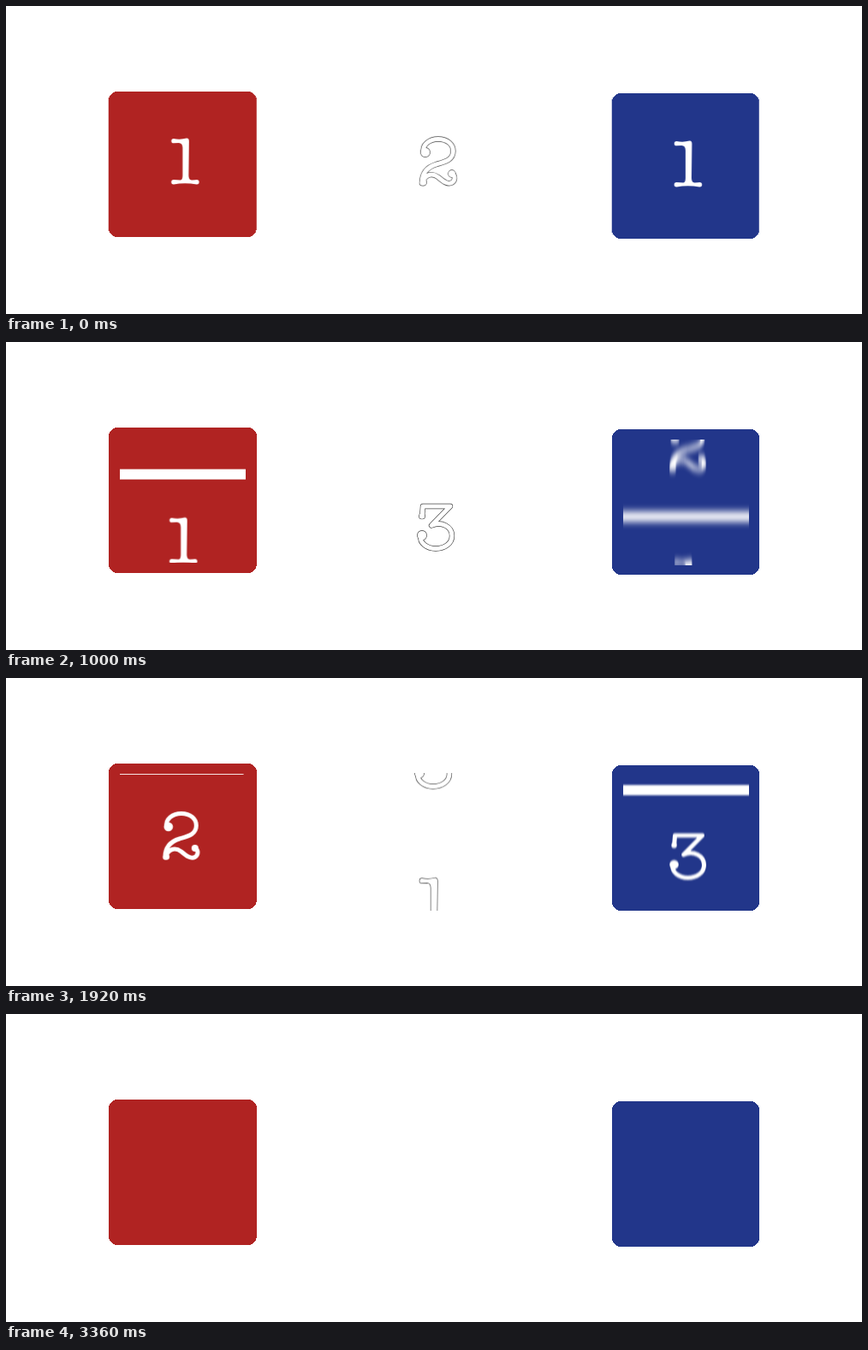
An HTML page without scripts for the animation above (3.84 s loop, 1000x360 px).

```html
<!DOCTYPE html>
<html lang="en">
<head>
<meta charset="utf-8">
<title>Three spinning reels</title>
<style>
  html, body { margin: 0; width: 100%; height: 100%; overflow: hidden; background: #fff; }
  svg { display: block; width: 100%; height: 100%; }

  /* --o widens a glyph, used for the hairline outline */
  .reel { color: #fff; --o: 0px; }
  .edge { color: #444; --o: 1.3px; }
  .pen { fill: none; stroke: currentColor; stroke-width: calc(5px + var(--o)); stroke-linejoin: round; }
  .solid { fill: currentColor; stroke: currentColor; stroke-width: var(--o); }
  .bars { fill: none; stroke: #fff; stroke-width: 180; stroke-dasharray: 12 147; }
  .box { shape-rendering: crispEdges; }

  .shake { animation: shake 3.84s infinite; }
  .strip { animation: spin 3.84s infinite; }
  .red  { --a: 304px; --b: 527px; --c: 852px; --end: 1115px; --lean: -.0045; }
  .mid  { --a: 304px; --b: 670px; --c: 1202px; --end: 1579px; --lean: -.0045; }
  .blue { --a: 161px; --b: 414.5px; --c: 728.5px; --end: 955.5px; --lean: 0; }

  @keyframes spin {
    0% { transform: translate(0, 0); animation-timing-function: cubic-bezier(.333, .03, .667, .45); }
    16.667% { transform: translate(calc(var(--a) * var(--lean)), var(--a)); animation-timing-function: cubic-bezier(.333, .27, .667, .69); }
    26.042% { transform: translate(calc(var(--b) * var(--lean)), var(--b)); animation-timing-function: cubic-bezier(.333, .38, .667, .785); }
    41.667% { transform: translate(calc(var(--c) * var(--lean)), var(--c)); animation-timing-function: cubic-bezier(.333, .85, .667, 1); }
    87.5%, 100% { transform: translate(calc(var(--end) * var(--lean)), var(--end)); }
  }
  /* four sine waves in the first second */
  @keyframes shake {
    0% { transform: translateX(0); animation-timing-function: ease-out; }
    1.628%, 8.138%, 14.648%, 21.159% { transform: translateX(-9px); animation-timing-function: cubic-bezier(.364, 0, .636, 1); }
    4.883%, 11.393%, 17.904% { transform: translateX(9px); animation-timing-function: cubic-bezier(.364, 0, .636, 1); }
    24.414% { transform: translateX(9px); animation-timing-function: ease-in; }
    26.042%, 100% { transform: translateX(0); }
  }
</style>
</head>
<body>
<svg viewBox="0 0 1000 360" role="img" aria-label="Three spinning number reels">
  <defs>
    <!-- digits: centred on x = 0, top at y = 0 -->
    <path id="d1" class="solid" d="M-13 1Q-5 2.5 2 .5Q5 0 5 4L4.5 44Q4.5 49 8 49.5Q13 49 14 49A2.7 2.7 0 0 1 14 54.5Q0 52-13 54.5A2.7 2.7 0 0 1-13 49Q-8 49-5 49.5Q-2.5 49-2.5 44V12Q-2.5 6-7 6L-13 6.3A2.6 2.6 0 0 1-13 1Z"/>
    <g id="d2">
      <path class="pen" d="M-17 17C-19 8-10 1.500 0 1.500C11 1.500 17.500 8 17.500 15.500C17.500 26 8 28-2 31C-12 34-19 40-19 53C-15 42-7 41 0 46C6 51 11 55 16 52.500C20 50 20 45 17 42"/>
      <circle class="solid" cx="-15" cy="17" r="5.300"/>
      <circle class="solid" cx="-17.500" cy="52" r="3.800"/>
      <circle class="solid" cx="16" cy="42" r="4"/>
    </g>
    <g id="d3">
      <path class="pen" d="M-16 16L-15 3H17L-5 25.500C7 20 19 27 19 37.500C19 47 10 52.500 0 52.500C-10 52.500-19 46-17.500 38"/>
      <circle class="solid" cx="-16" cy="14.500" r="3.200"/>
      <circle class="solid" cx="-16" cy="37" r="5.300"/>
    </g>

    <g id="midDigits">
      <use href="#d2" x="505" y="154"/>
      <use href="#d3" x="505" y="-5"/>
      <use href="#d1" x="505" y="-164"/>
      <use href="#d2" x="505" y="-323"/>
      <use href="#d3" x="505" y="-482"/>
      <use href="#d1" x="505" y="-641"/>
      <use href="#d3" x="505" y="-800"/>
      <use href="#d2" x="505" y="-959"/>
      <use href="#d1" x="505" y="-1119"/>
      <use href="#d3" x="505" y="-1278"/>
    </g>

    <clipPath id="redWin"><rect x="133" y="112" width="147" height="146"/></clipPath>
    <clipPath id="midWin"><rect x="427" y="111" width="147" height="161"/></clipPath>
    <clipPath id="blueWin"><rect x="721" y="114" width="147" height="147"/></clipPath>

    <filter id="speed" filterUnits="userSpaceOnUse" x="700" y="80" width="190" height="220" color-interpolation-filters="sRGB">
      <feGaussianBlur stdDeviation="0 .01">
        <animate attributeName="stdDeviation" dur="3.84s" repeatCount="indefinite"
          keyTimes="0;.1667;.2604;.4167;.5833;.75;1"
          values="0 .01;0 3;0 4;0 1.7;0 .6;0 .01;0 .01"/>
      </feGaussianBlur>
    </filter>
  </defs>

  <g class="shake">
    <rect class="box" x="120" y="100" width="173" height="170" rx="10" fill="#b02322"/>
    <g class="reel" clip-path="url(#redWin)">
      <g class="strip red">
        <path class="bars" d="M206-697V110"/>
        <rect x="120" y="-856" width="161.700" height="12" fill="#fff"/>
        <use href="#d1" x="209" y="154"/>
        <use href="#d2" x="209" y="-5"/>
        <use href="#d3" x="209" y="-164"/>
        <use href="#d1" x="209" y="-323"/>
        <use href="#d3" x="209" y="-482"/>
        <use href="#d1" x="209" y="-641"/>
        <use href="#d2" x="209" y="-800"/>
      </g>
    </g>

    <g class="reel" clip-path="url(#midWin)">
      <g class="strip mid">
        <use href="#midDigits" class="edge"/>
        <use href="#midDigits"/>
      </g>
    </g>

    <rect class="box" x="708" y="102" width="172" height="170" rx="10" fill="#22368a"/>
    <g class="reel" clip-path="url(#blueWin)">
      <g filter="url(#speed)">
        <g class="strip blue">
          <path class="bars" d="M794-694V113"/>
          <use href="#d1" x="796.500" y="157"/>
          <use href="#d3" x="796.500" y="-2"/>
          <use href="#d1" x="796.500" y="-161"/>
          <use href="#d2" x="796.500" y="-320"/>
          <use href="#d1" x="796.500" y="-479"/>
          <use href="#d3" x="796.500" y="-638"/>
        </g>
      </g>
    </g>
  </g>
</svg>
</body>
</html>
```
